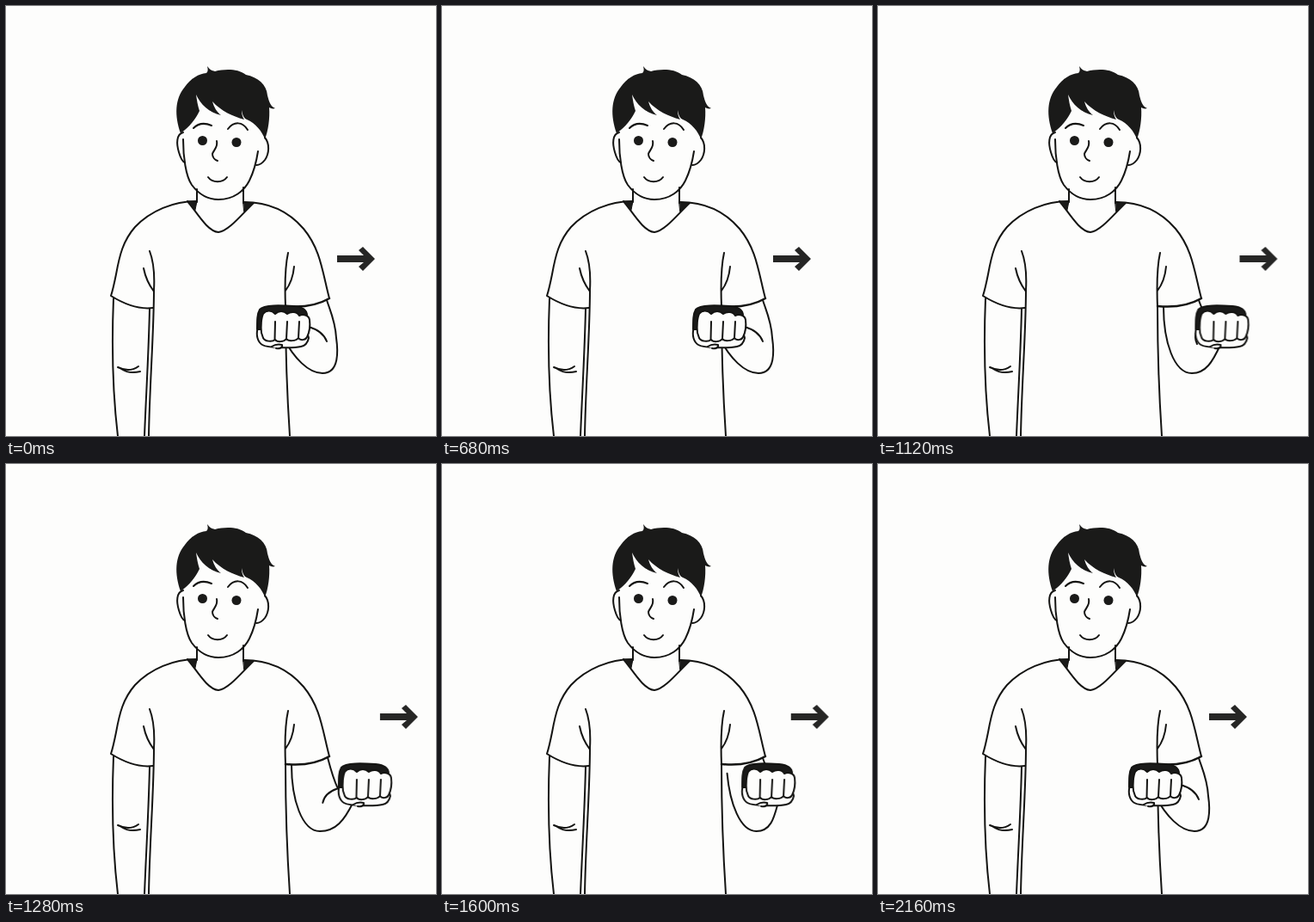
Recreate the animation shown at these times as an HTML page without scripts. Size 500 px wide and 500 px high, loop 3 s.

```html
<!DOCTYPE html>
<html lang="en">
<head>
<meta charset="utf-8">
<title>Fist moving sideways</title>
<style>
  html, body { margin: 0; width: 100%; height: 100%; overflow: hidden; background: #fdfdfc; }
  svg { display: block; width: 100vw; height: 100vh; }
  .line { fill: none; stroke: #141412; stroke-width: 2; stroke-linecap: round; stroke-linejoin: round; }
  .skin { fill: #fdfdfc; }
  .dark { fill: #1a1a19; }
  .arrow { fill: #262625; }
  .arrow, .fist, .forearm, .near, .far { animation: 3s linear infinite; }
  .arrow { animation-name: arrow; }
  .fist { animation-name: fist; }
  .forearm { animation-name: forearm; }
  .near { animation-name: near; }
  .far { animation-name: far; }

  @keyframes arrow {
    0%, 26.4% { transform: none; animation-timing-function: cubic-bezier(.65, 0, .5, 1); }
    43.333% { transform: translateX(50px); }
    47.333% { transform: translateX(50px); animation-timing-function: cubic-bezier(.3, 0, .1, 1); }
    66.667%, 100% { transform: none; }
  }
  @keyframes fist {
    0%, 23.333% { transform: none; animation-timing-function: ease-in-out; }
    43.333% { transform: translateX(95px); }
    47.333% { transform: translateX(95px); animation-timing-function: cubic-bezier(.27, 0, .16, 1); }
    72%, 100% { transform: none; }
  }
  /* the elbow swings from bent inward to bent outward */
  @keyframes forearm {
    0%, 23.333%, 72%, 100% { d: path("M322 385C335 410 352 427 368 427C388 427 386 400 384 386C383 366 376 352 373 342"); }
    32%, 55.667% { d: path("M331 372C338 400 350 427 366 427C388 427 384 400 384 386C382 366 377 352 373 342"); }
    37.333%, 51.5% { d: path("M332 350C332 390 344 427 365 427C381 427 389 414 398 394C392 380 378 358 373 342"); }
    43.333%, 47.333% { d: path("M332 350C332 390 344 427 365 427C384 427 394 414 404 394C388 392 382 372 374 341"); }
    60% { d: path("M320 380C332 410 350 427 367 427C387 427 385 400 384 386C383 366 376 352 372 342"); }
  }
  /* skin folds swap while the fist covers both */
  @keyframes near {
    0%, 32.8% { opacity: 1; }
    32.81%, 55.2% { opacity: 0; }
    55.21%, 100% { opacity: 1; }
  }
  @keyframes far {
    0%, 32.8% { opacity: 0; }
    32.81% { opacity: 1; }
    37.333%, 51% { d: path("M371 393C368 387 369 380 372 375"); }
    43.333%, 47.333% { d: path("M368 394C370 386 376 381 386 378"); }
    55.2% { opacity: 1; }
    55.21%, 100% { opacity: 0; }
  }
</style>
</head>
<body>
<svg viewBox="0 0 500 500">
  <g class="line">
    <!-- left arm and torso -->
    <path d="M125 340C123 390 124 450 130 500M167 352C166 400 163 450 161 500"/>
    <path d="M130 420C138 424 147 424 154 419M134 422C140 426 148 427 156 425"/>
    <path d="M167 285C172 298 173 312 172 330C172 380 167 440 166 500M160 305C162 315 166 324 172 332"/>
    <path d="M328 287C324 305 324 325 325 350C325 400 326 440 330 500M335 303C334 314 331 323 325 331"/>

    <!-- shirt -->
    <path d="M221 227C195 227 168 238 150 257C136 273 132 290 128 312C126 322 124 331 122 337C138 347 155 353 171 351"/>
    <path class="forearm skin" d="M322 385C335 410 352 427 368 427C388 427 386 400 384 386C383 366 376 352 373 342"/>
    <path class="near" d="M352 373C362 376 370 382 373 390"/>
    <path class="far" d="M371 393C368 387 369 380 372 375"/>
    <path d="M277 228C305 228 328 238 346 259C366 283 368 310 376 340"/>
    <path stroke-width="2.500" d="M376 340C362 348 345 351 325 349"/>
    <path d="M211 227C222 240 234 262 247 263C259 262 276 240 288 229"/>
    <path d="M222 213V228M276 211V229"/>
    <path class="dark" stroke-width="1" d="M211 227H222L220 237ZM276 228L288 229L277 239Z"/>

    <!-- face -->
    <path d="M206 147C198 149 198 160 201 170C203 177 205 181 208 182"/>
    <path d="M301 153C307 160 306 172 301 179C298 183 295 185 291 185"/>
    <path d="M206 155C206 175 209 198 216 208C225 220 236 225 247 225C265 225 277 215 283 203C288 193 291 182 293 169"/>
    <path d="M218 142C224 136 232 136 239 139M258 143C265 134 275 134 281 144"/>
    <path d="M245 157C247 164 241 168 240 172C240 176 243 179 246 180M235 199C240 206 252 206 257 199"/>
  </g>
  <g class="dark">
    <circle cx="228.500" cy="156.500" r="5.500"/>
    <circle cx="268" cy="158.500" r="5.500"/>
    <path d="M203 148C196 128 196 108 208 94C215 84 224 79 233 78C235 76 235 74 234 70C237 74 239 75 243 76C255 73 270 73 279 80C293 83 303 91 304 104C306 112 308 117 313 119C310 120 308 119 306 118C307 130 305 145 301 155C298 146 290 136 280 132C276 130 275 126 274 121C274 126 275 129 277 132C263 128 250 122 240 111C242 118 245 123 250 127C236 124 226 114 221 103C222 110 223 116 225 122C220 132 214 140 203 148Z"/>
  </g>
  <path class="arrow" d="M385 290H416L410 284L415 280L429 294L415 308L410 303L416 298H385Z"/>
  <g class="fist line">
    <path class="skin" d="M293 374C290 383 293 391 298 394C304 398 335 398 343 396C348 395 351 391 352 386L345 360H298Z"/>
    <path class="dark" d="M292 376C292 365 292 358 295 353C300 347 320 348 335 349C345 350 350 354 350 360L345 368L298 376Z"/>
    <path class="skin" d="M297 380C296 372 297 362 299 358C303 353 309 354 313 358C317 354 323 354 327 358C331 355 338 355 341 360C345 358 352 359 353 365C354 373 352 381 350 385C348 389 342 389 340 386C337 390 328 390 326 387C323 391 315 391 313 388C309 391 301 390 299 386Z"/>
    <path d="M313 367L312.500 388M327 367L326 387M341 367L340 386"/>
    <path class="skin" d="M309 396C312 394 317 393 321 394C322 397 318 399 314 398"/>
  </g>
</svg>
</body>
</html>
```
